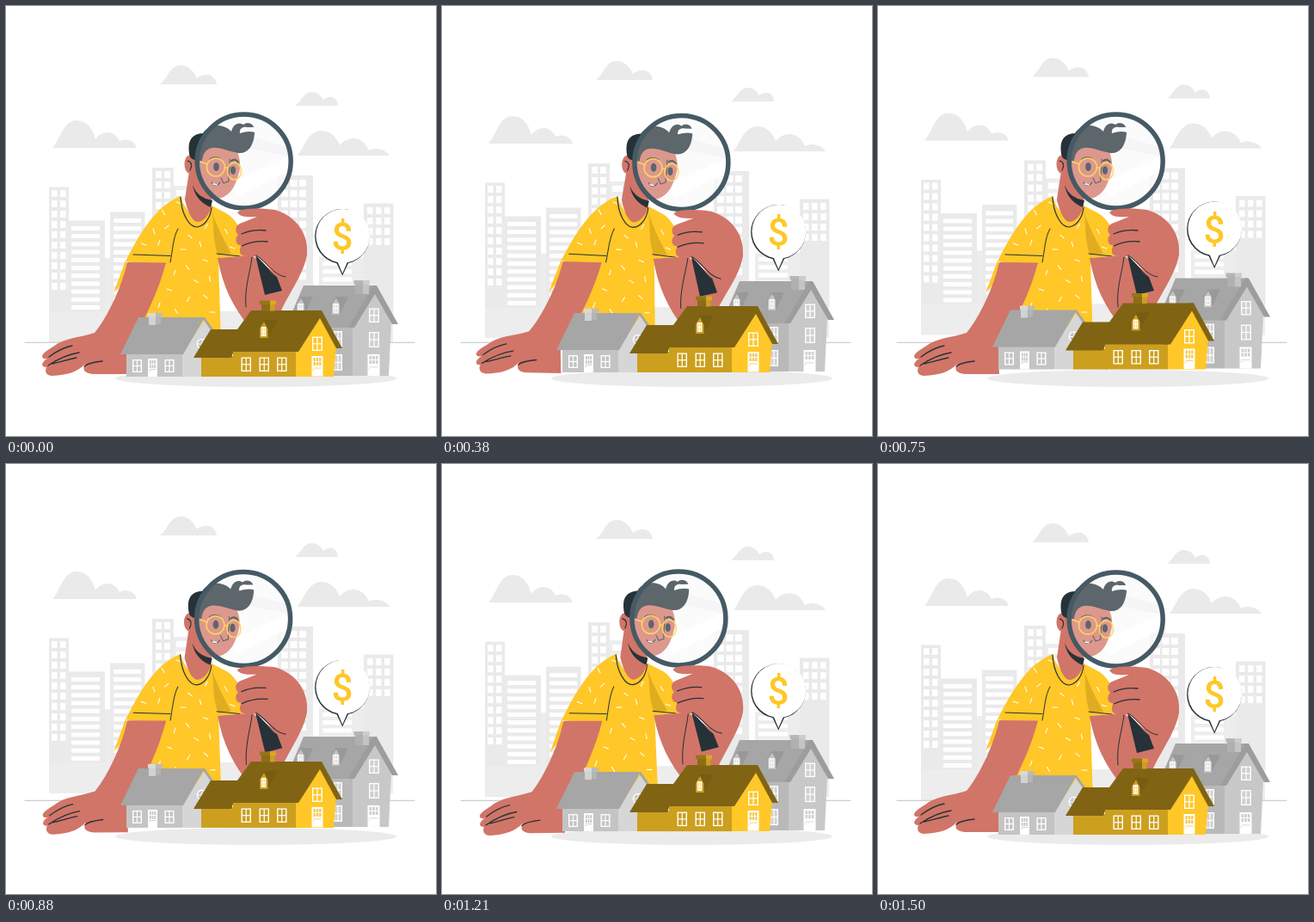
These frames come from a looping animation (500x500 px, 1.54 s). An HTML page:

```html
<!DOCTYPE html>
<html lang="en">
<head>
<meta charset="utf-8">
<title>House search</title>
<style>
html, body { margin: 0; width: 100%; height: 100%; overflow: hidden; background: #fff; }
svg { display: block; width: 100vw; height: 100vh; }
</style>
</head>
<body>
<svg id="stage" viewBox="0 0 500 500"></svg>
<script>
const INK = '#263238', SKIN = '#d17568', GOLD = '#ffc727', STEEL = '#455a64';
const rect = (x, y, w, h, fill) =>
  `<rect x="${x}" y="${y}" width="${w}" height="${h}" fill="${fill}"/>`;
const shape = (d, fill) => `<path d="${d}" fill="${fill}"/>`;
const line = (d, w = 1, color = INK) =>
  `<path d="${d}" fill="none" stroke="${color}" stroke-width="${w}" stroke-linecap="round" stroke-linejoin="round"/>`;
const oval = (x, y, rx, ry, fill) =>
  `<ellipse cx="${x}" cy="${y}" rx="${rx}" ry="${ry}" fill="${fill}"/>`;
const group = (kind, body) => `<g class="${kind}">${body}</g>`;

// Evenly spaced cells: columns x rows
function grid(x, y, cols, rows, dx, dy, w, h, fill = '#fff') {
  let out = '';
  for (let r = 0; r < rows; r++)
    for (let c = 0; c < cols; c++) out += rect(x + c * dx, y + r * dy, w, h, fill);
  return out;
}

function win(x, y, w, h, pane, rows = 2) {
  const pw = (w - 4) / 2, ph = (h - 2.6 - (rows - 1) * 1.2) / rows;
  return rect(x, y, w, h, '#fff') +
    grid(x + 1.4, y + 1.3, 2, rows, pw + 1.2, ph + 1.2, pw, ph, pane);
}

function door(x, y, w, h, pane) {
  return rect(x, y, w, h, '#fff') +
    grid(x + 2, y + 2, 3, 2, (w - 3) / 3, 5, (w - 3) / 3 - 1, 4, pane) +
    rect(x + 2, y + h * .58, w - 4, .8, pane) +
    oval(x + 2, y + h * .68, .7, .7, pane);
}

function skyline() {
  const front = '#eaeaea', back = '#ededed';
  return rect(50, 355, 400, 36, back) +
    rect(108, 293, 16, 70, back) + rect(195, 209, 18, 150, back) +
    rect(50, 210.5, 23, 145, front) + grid(53, 214, 2, 10, 10, 12, 6.5, 8) +
    rect(73, 249.5, 42, 106, front) + grid(76, 256, 1, 11, 0, 9.2, 33, 5) +
    rect(121, 239.5, 40.5, 116, front) + grid(125, 247, 1, 11, 0, 9.2, 32, 5) +
    rect(170, 188, 25, 168, front) + grid(174, 192, 2, 10, 10, 12, 7, 8) +
    grid(198, 214, 1, 6, 0, 12, 12, 7) +
    rect(364, 292, 54, 70, back) + grid(368, 297, 1, 5, 0, 9.2, 34, 5) +
    rect(316, 197, 41, 165, front) + grid(320, 202, 3, 10, 10.5, 12, 8, 8) +
    rect(416, 229.5, 34.5, 126, front) + grid(420, 234, 3, 4, 10, 12, 6.5, 8);
}

function clouds() {
  return [
    'M179 91C188 85 190 69 203 69C213 69 219 77 222 84C226 80 236 78 240 82Q244 85 245 91Z',
    'M54 165C63 156 66 133 82 133C96 133 102 147 104 155C110 145 126 143 132 157C141 153 150 157 152 165Z',
    'M336 116C343 112 346 100 355 100C363 100 367 105 369 109C375 104 385 104 386 116Z',
    'M339 174C347 164 351 145 367 145C378 145 385 154 388 162C396 152 414 149 422 168C431 163 443 168 446 174Z'
  ].map(d => shape(d, '#eaeaea')).join('');
}

function houseLeft() {
  const wall = '#c4c4c4', gable = '#d6d6d6', roof = '#a6a6a6';
  return shape('M205 431V404L230 366L262 404V431Z', gable) +
    rect(140, 403, 65, 28, wall) +
    shape('M133 405L154 362H231L206 405Z', roof) +
    shape('M228 362H231L262 405H257Z', roof) +
    rect(166, 361, 8, 10, '#d2d2d2') + rect(174, 361, 6, 9, '#b4b4b4') +
    rect(165, 357, 9, 4.5, '#d9d9d9') + rect(174, 357, 8, 4.5, '#bbb') +
    win(147, 411, 11, 15, wall) + door(165, 410, 11, 21, wall) +
    win(184.5, 411, 11, 15, wall) +
    `<circle cx="228" cy="393" r="5.6" fill="${wall}" stroke="#fff" stroke-width="1.4"/>` +
    line('M222.5 393H233.5M228 387.5V398.5', 1, '#fff');
}

function houseRight() {
  const pane = '#d0d0d0', roof = '#a6a6a6';
  const dormer = (x, y) =>
    shape(`M${x} ${y + 9}L${x + 6} ${y}H${x + 20}L${x + 10} ${y + 21}H${x + 1}Z`, '#999') +
    shape(`M${x + 1} ${y + 21}V${y + 9}L${x + 6} ${y + 2}L${x + 10} ${y + 9}V${y + 21}Z`, '#c4c4c4') +
    win(x + 2.5, y + 8, 6, 11, '#ccc');
  return shape('M348 372H403V430H348Z', '#b9b9b9') +
    shape('M403 430V374L430 332L448 368L445 430Z', '#c8c8c8') +
    shape('M325 374L346 325H430L403 374Z', roof) +
    shape('M427 325H431L456 370H449L429 335L405 374H398Z', '#9d9d9d') +
    rect(406, 323, 9, 12, '#b0b0b0') + rect(415, 323, 7, 12, '#c4c4c4') +
    rect(404.5, 319, 10.5, 4.5, '#b6b6b6') + rect(415, 319, 8, 4.5, '#cdcdcd') +
    dormer(378, 338) + dormer(337, 338) +
    win(422, 351.5, 12, 16.5, pane) + win(422, 379, 12, 18, pane) +
    win(381, 378, 10, 18, pane) + win(381, 405, 10, 19, pane) +
    door(420.5, 405, 14, 25, pane);
}

function houseGold() {
  const wall = '#cc9f1f', roof = '#806414';
  return rect(227, 407, 40, 24, wall) +
    shape('M218 409L238 376H274L262 409Z', roof) +
    rect(264, 400, 73, 31, wall) +
    shape('M337 431V402L365 358L384 394L381 431Z', GOLD) +
    shape('M250 402L285 354H367L337 402Z', roof) +
    shape('M362 354H367L391 398H384L365 363L340 402H333Z', roof) +
    rect(297, 346, 15, 8.5, '#8c6d16') + rect(307, 346, 5.5, 8.5, wall) +
    rect(295, 342.5, 12, 4.5, '#967517') + rect(307, 342.5, 7, 4.5, '#dba921') +
    shape('M294 375L300 365H316L304 386H295Z', '#775d12') +
    shape('M295 386V375L300 367L304.5 376V386Z', wall) + win(296.8, 373, 5.6, 11, GOLD) +
    [273.5, 294.5, 315].map(x => win(x, 408.5, 11.5, 16.5, wall)).join('') +
    win(356, 384.5, 12, 16.5, GOLD) + door(355.5, 407, 13, 23.5, '#f5c84d');
}

function bubble() {
  return oval(391, 268, 31.9, 31.9, INK) + shape('M383.5 297L391.2 313.5L399 297Z', INK) +
    oval(391.8, 267.3, 31.4, 31.4, '#fff') + shape('M385 296L391.2 311L397.7 296Z', '#fff') +
    `<text x="391" y="283.3" text-anchor="middle" font-family="Roboto, sans-serif" font-weight="500" font-size="44" fill="${GOLD}">$</text>`;
}

// x, y, angle of the shirt's white dashes
const dashes = [
  [183, 240, 60], [201, 229, 20], [172, 262, 70], [187, 257, -40], [160, 277, 20], [178, 275, 110],
  [214, 268, 40], [233, 256, 120], [206, 283, 0], [226, 277, 75], [211, 304, 50], [232, 296, 20],
  [196, 310, 110], [221, 320, 30], [237, 317, 80], [190, 330, 20], [212, 341, 120], [232, 338, 40],
  [178, 348, 110], [198, 355, 60], [240, 356, 0], [256, 262, 60], [263, 281, 20]
];

function shirt() {
  return shape('M139 296L125 334L146 310Z', GOLD) +
    shape('M203 221C178 231 160 255 139 297L172 302L150 372V395H250L247 293L286 290C279 274 272 252 258 242L239 232C236 248 214 256 203 221Z', GOLD) +
    shape('M239 238C243 253 239 272 247 290L262 288C252 270 244 254 239 238Z', '#e0ac20') +
    dashes.map(([x, y, a]) =>
      `<path d="M-3 0H3" transform="translate(${x} ${y}) rotate(${a})" stroke="#fff" stroke-width="1.1" stroke-linecap="round"/>`).join('') +
    line('M148 289L191 290.5M191 298C194 283 194 270 200 259M245 288L272 291') +
    line('M203 222C204 242 213 257 222 257C231 256 238 246 239 234', 1.2);
}

function leftArm() {
  return shape('M141 298C135 326 118 362 103 380C84 386 67 386 55 396C47 401 42 404 42 408Q43 411 48 410C41 414 40 420 47 420C45 424 46 430 54 430C71 429 83 426 92 416C88 424 92 427 101 428H141L140 402C160 368 178 330 186 298.500Z', SKIN) +
    line('M50 408C58 402 67 397 77 395M49 418C61 410 72 405 85 403M54 416C66 413 76 410 82 409', 1.3) +
    line('M91 419C95 415 103 414 112 413', 1.3);
}

function head() {
  const hair = 'M228 180C219 180 215 178 213.500 174C211 160 213 149 229 148C235 138 252 135 262 146C264 138 270 134 276 138C280 134 290 135 289 148C288 163 281 172 270 171C258 169 250 164 240 165C232 166 229 172 228 180Z';
  return shape('M213 192L208 225C212 243 218 252 224 251C232 249 238 240 239 231L240 205Z', SKIN) +
    shape('M217 208C221 219 229 224 240 226L238 234C226 229 219 220 217 208Z', INK) +
    oval(213.5, 184, 6, 10.5, SKIN) +
    line('M211 180C216 181 217 186 214 191', 1.2) +
    shape('M221 164H266C275 180 273 191 268 203C264 215 256 223 246 224C230 225 217 210 216 194Z', SKIN) +
    shape(hair, INK) +
    shape('M272 148C271 142 276 140 280 141H289L290 147C284 145 278 146 272 148Z', '#fff') +
    oval(244.5, 187, 3.3, 5, INK) + oval(264, 191, 3, 4.8, INK) +
    line('M237 178Q243 174 250 178', 1.4) + line('M262 180Q267 177 270 182', 2.2) +
    line('M260 178C261 188 258 195 259 204L253 206L250 200', 1.1) +
    line('M239 205C242 210 246 210 249 205', 1.1) + line('M241 207L245 208', 1.4, '#fff') +
    `<g fill="none" stroke="${GOLD}" stroke-width="1.5"><circle cx="244" cy="187.500" r="10.500"/>` +
    `<ellipse cx="265.500" cy="192" rx="8" ry="10"/><path d="M254 189Q256 187 258 189M226 181L234 184"/></g>`;
}

function magnifier() {
  const lens = '<circle cx="276.700" cy="180.500" r="54.500"';
  return `<clipPath id="lens">${lens}/></clipPath>` +
    `${lens} fill="#f7f7f8" fill-opacity=".7"/>` +
    `<g clip-path="url(#lens)">` + shape('M262 205L338 171V187L269 222Z', '#fff') +
    shape('M278 150L335 166V176L276 164Z', '#f1f1f4') + '</g>' + head() +
    `${lens} fill="#fff" fill-opacity=".25"/>` +
    `${lens} fill="none" stroke="${STEEL}" stroke-width="5.500"/>`;
}

function rightArm() {
  return shape('M246 293L286 290L310 308L350 285C349 308 332 328 318 358L282 372C264 350 252 326 246 293Z', SKIN) +
    shape('M269 240C274 234 300 235 313 237C339 245 352 266 350 289C347 305 338 318 326 316C311 314 304 299 291 291C281 292 271 292 272 284C272 280 274 279 276 278C267 280 265 271 270 266C266 262 266 256 272 253L292 245C280 246 272 245 269 240Z', SKIN) +
    shape('M290 290C300 298 308 311 315 315L321 331L301 336Z', INK) +
    line('M274 265C283 261 293 260 302 261M274 279C283 275 295 273 304 274', 1.3) +
    line('M286 292C284 310 277 327 279 350M291 290C303 297 311 313 325 315');
}

document.getElementById('stage').innerHTML =
  group('float', clouds() + skyline()) +
  line('M22 391.3H475', .5, '#7d868a') +
  oval(290.5, 433, 163.5, 10, '#ebebeb') +
  group('float', houseRight()) +
  group('sway', shirt() + leftArm() + magnifier() + rightArm()) +
  group('float', houseLeft() + houseGold() + bubble());

const LOOP = 1540, STEPS = 37;
const floats = document.querySelectorAll('.float');
const sway = document.querySelector('.sway');

// Piecewise linear track of [ms, value] pairs
function at(track, t) {
  let i = 1;
  while (i < track.length - 1 && t > track[i][0]) i++;
  const [t0, a] = track[i - 1], [t1, b] = track[i];
  return a + (b - a) * (t - t0) / (t1 - t0);
}
const lift = [[0, 0], [600, -8], [750, -8.5], [900, -8], [1500, 0]];
const tilt = [[0, 0], [375, 1], [1125, -1], [1500, 0]];

const start = performance.now();
function draw() {
  const step = Math.floor((performance.now() - start) % LOOP / LOOP * STEPS);
  const t = step * 1000 / 24;
  floats.forEach(g => g.setAttribute('transform', `translate(0 ${at(lift, t)})`));
  sway.setAttribute('transform', `rotate(${at(tilt, t)} 197 277)`);
  requestAnimationFrame(draw);
}
draw();
</script>
</body>
</html>
```
